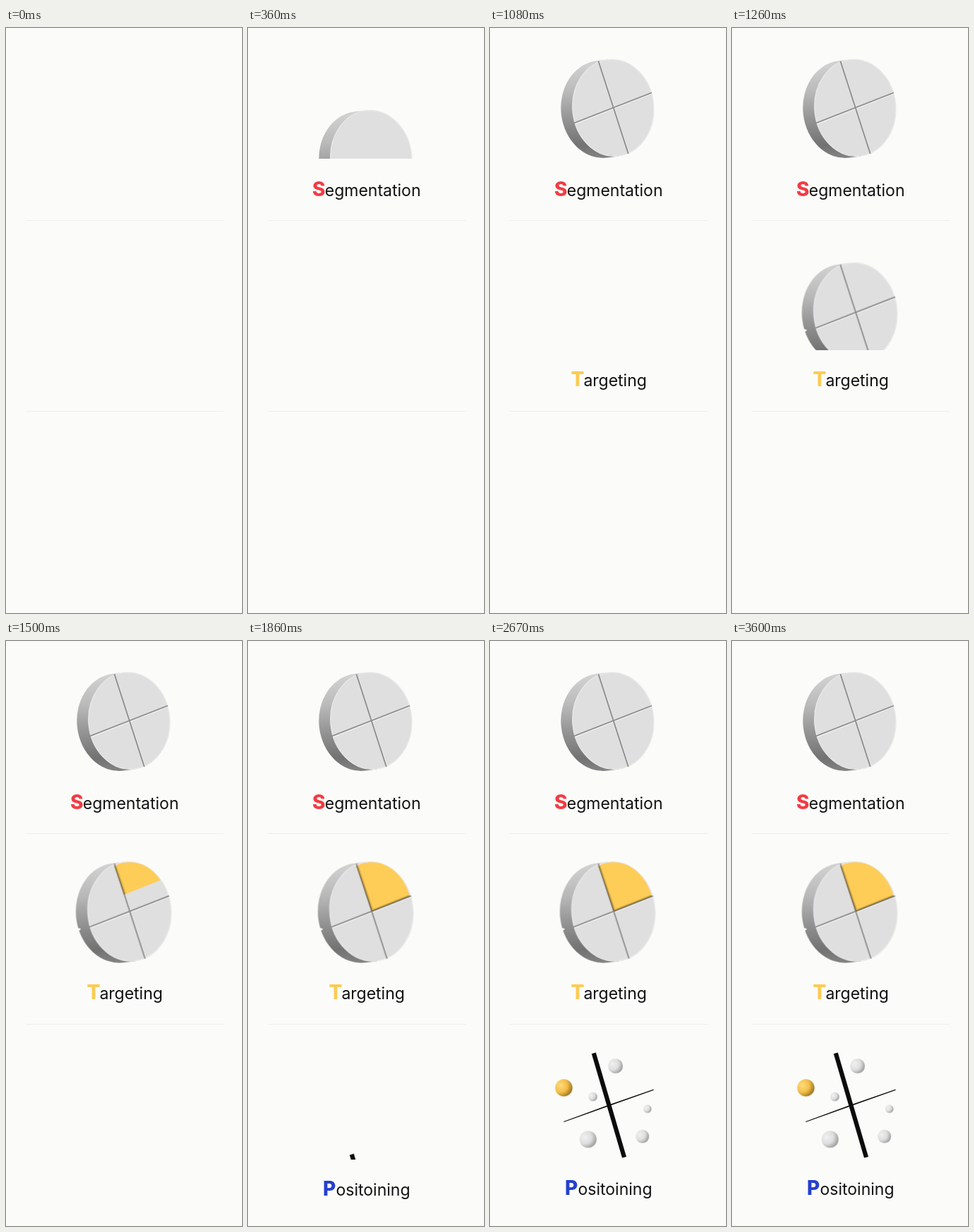
An HTML page that plays this animation: 334 by 828 pixels, repeating every 4500 ms.

```html
<!DOCTYPE html>
<html lang="en">
<head>
<meta charset="utf-8">
<title>Segmentation, Targeting, Positioning</title>
<style>
  html, body { margin: 0; width: 100%; height: 100%; overflow: hidden; background: #fbfbf9; }
  svg { display: block; }
  text { font: 400 23px Inter, "Noto Sans", sans-serif; fill: #111; }
  .cap { font-size: 28px; font-weight: 800; }

  .move { animation: 4500ms cubic-bezier(.33, 1, .68, 1) infinite; }
  .word { --dy: 36px; }
  .disc1 { --dy: 142px; }
  .disc2 { --dy: 147px; }
  .axes { --dy: 152px; }
  .word1 { animation-name: word1; }
  .word2 { animation-name: word2; }
  .word3 { animation-name: word3; }
  .disc1 { animation-name: disc1; }
  .disc2 { animation-name: disc2; }
  .axes { animation-name: axes; }
  .cuts { animation-name: cuts; stroke-dasharray: 1 1.1; }
  .wipe { animation-name: wipe; }
  .ball { animation-name: ball; }

  /* percentages of the 4.5 s loop */
  @keyframes word1 { 0%, 2.667% { transform: translateY(var(--dy)); } 8%, 100% { transform: none; } }
  @keyframes word2 { 0%, 19.333% { transform: translateY(var(--dy)); } 24%, 100% { transform: none; } }
  @keyframes word3 { 0%, 37.333% { transform: translateY(var(--dy)); } 42.667%, 100% { transform: none; } }
  @keyframes disc1 { 0%, 6.4% { transform: translateY(var(--dy)); } 14.4%, 100% { transform: none; } }
  @keyframes disc2 { 0%, 24.2% { transform: translateY(var(--dy)); } 32%, 100% { transform: none; } }
  @keyframes axes { 0%, 41.2% { transform: translateY(var(--dy)); } 49.2%, 100% { transform: none; } }
  @keyframes cuts { 0%, 14.4% { stroke-dashoffset: 1.05; } 20%, 100% { stroke-dashoffset: 0; } }
  @keyframes wipe { 0%, 31% { transform: translate(-22px, -67px); } 39%, 100% { transform: none; } }
  @keyframes ball { 0%, 50.4% { transform: scale(0); } 58.667%, 100% { transform: none; } }
</style>
</head>
<body>
<svg width="334" height="828" viewBox="0 0 334 828">
  <defs>
    <linearGradient id="sideFill" x1="0" y1="0" x2="0" y2="1">
      <stop offset="0" stop-color="#d3d3d3"/>
      <stop offset=".3" stop-color="#b9b9b9"/>
      <stop offset=".55" stop-color="#979797"/>
      <stop offset=".85" stop-color="#727272"/>
      <stop offset="1" stop-color="#848484"/>
    </linearGradient>
    <radialGradient id="grayBall" cx=".3" cy=".36" r=".74">
      <stop offset="0" stop-color="#f1f1f1"/>
      <stop offset=".55" stop-color="#dedede"/>
      <stop offset="1" stop-color="#9a9a9a"/>
    </radialGradient>
    <radialGradient id="goldBall" cx=".3" cy=".36" r=".74">
      <stop offset="0" stop-color="#ffdb7c"/>
      <stop offset=".55" stop-color="#f3be48"/>
      <stop offset="1" stop-color="#94701f"/>
    </radialGradient>

    <!-- disc parts, centred on the front face -->
    <g id="body" transform="rotate(-5)">
      <path d="M-1.9,-69 l-16,.6 A58 69 0 0 0 -14.1,69.6 l16,-.6z" fill="url(#sideFill)"/>
      <ellipse rx="57.4" ry="68.4" fill="#dfdfdf" stroke="#e8e8e8" stroke-width="1.4"/>
    </g>
    <g id="cross" fill="none">
      <g stroke="#efefef" stroke-width="1.3" transform="translate(1.3 1.3)">
        <path pathLength="1" d="M-20.4,-64.5 L21,63"/>
        <path pathLength="1" d="M-55,21.5 L53.5,-21.3"/>
      </g>
      <g stroke="#8b8b8b" stroke-width="1.8">
        <path pathLength="1" d="M-20.8,-66 L21.5,65"/>
        <path pathLength="1" d="M-55.3,21.5 L54.7,-21.5"/>
      </g>
    </g>
    <clipPath id="reveal">
      <path class="move wipe" d="M-80,32.6 L80,-31.4 V-160 H-80z"/>
    </clipPath>
    <circle id="gray" r="1" fill="url(#grayBall)"/>
    <circle id="gold" r="1" fill="url(#goldBall)"/>
  </defs>

  <rect width="334" height="828" fill="#fbfbf9"/>
  <path d="M28,272.5 H308 M28,542.5 H308" stroke="#eeeeec"/>

  <!-- each nested svg masks what rises inside it -->
  <svg y="40" width="334" height="144.5" viewBox="0 40 334 144.5">
    <g class="move disc1">
      <g transform="translate(174.3 113)">
        <use href="#body"/>
        <use href="#cross" class="move cuts"/>
      </g>
    </g>
  </svg>
  <svg y="208" width="334" height="38" viewBox="0 208 334 38">
    <g class="move word word1">
      <text class="cap" x="91" y="238.2" style="fill:#f23c44">S</text>
      <text x="108.8" y="238.2">egmentation</text>
    </g>
  </svg>

  <svg y="308" width="334" height="148" viewBox="0 308 334 148">
    <g class="move disc2">
      <g transform="translate(174.7 382.8) scale(1.026)">
        <use href="#body"/>
        <path d="M-75,22 l8,1.6 l-1.6,2.4 l-6.4,-1z" fill="#fbfbf9"/>
        <use href="#cross"/>
        <g clip-path="url(#reveal)" fill="none">
          <path d="M.7,-.5 L-20.4,-63.3 A55.5 68 0 0 1 52.7,-21.3z" fill="#fecd57"/>
          <path d="M-19,-63 L1.6,-1.8 L52,-22" stroke="#d9ac4a" stroke-width="2.4"/>
          <path d="M-20.4,-63.3 L.7,-.5 L52.7,-21.3" stroke="#78683f" stroke-width="1.4"/>
        </g>
      </g>
    </g>
  </svg>
  <svg y="477" width="334" height="38" viewBox="0 477 334 38">
    <g class="move word word2">
      <text class="cap" x="114.6" y="506.8" style="fill:#fbcb55">T</text>
      <text x="132.4" y="506.8">argeting</text>
    </g>
  </svg>

  <svg y="578" width="334" height="156" viewBox="0 578 334 156">
    <g class="move axes" fill="#0b0b0b">
      <path d="M143.8,584.2 l6,-1.6 L193,730 l-6,1.6z"/>
      <path d="M104.3,680 L168,656.6 L231.5,634.4 L231.7,635.8 L168.4,658.2 L104.5,680.9z"/>
    </g>
  </svg>
  <g transform="translate(104.5 632.4) scale(12.2)"><use href="#gold" class="move ball"/></g>
  <g transform="translate(177.6 601.6) scale(10.5)"><use href="#gray" class="move ball"/></g>
  <g transform="translate(145.5 645) scale(6.3)"><use href="#gray" class="move ball"/></g>
  <g transform="translate(222.8 662.2) scale(5.8)"><use href="#gray" class="move ball"/></g>
  <g transform="translate(138.8 705.3) scale(12)"><use href="#gray" class="move ball"/></g>
  <g transform="translate(215.7 701.2) scale(9.5)"><use href="#gray" class="move ball"/></g>
  <svg y="754" width="334" height="38" viewBox="0 754 334 38">
    <g class="move word word3">
      <text class="cap" x="106" y="784.2" style="fill:#2440d0">P</text>
      <text x="124.5" y="784.2">ositoining</text>
    </g>
  </svg>
</svg>
</body>
</html>
```
